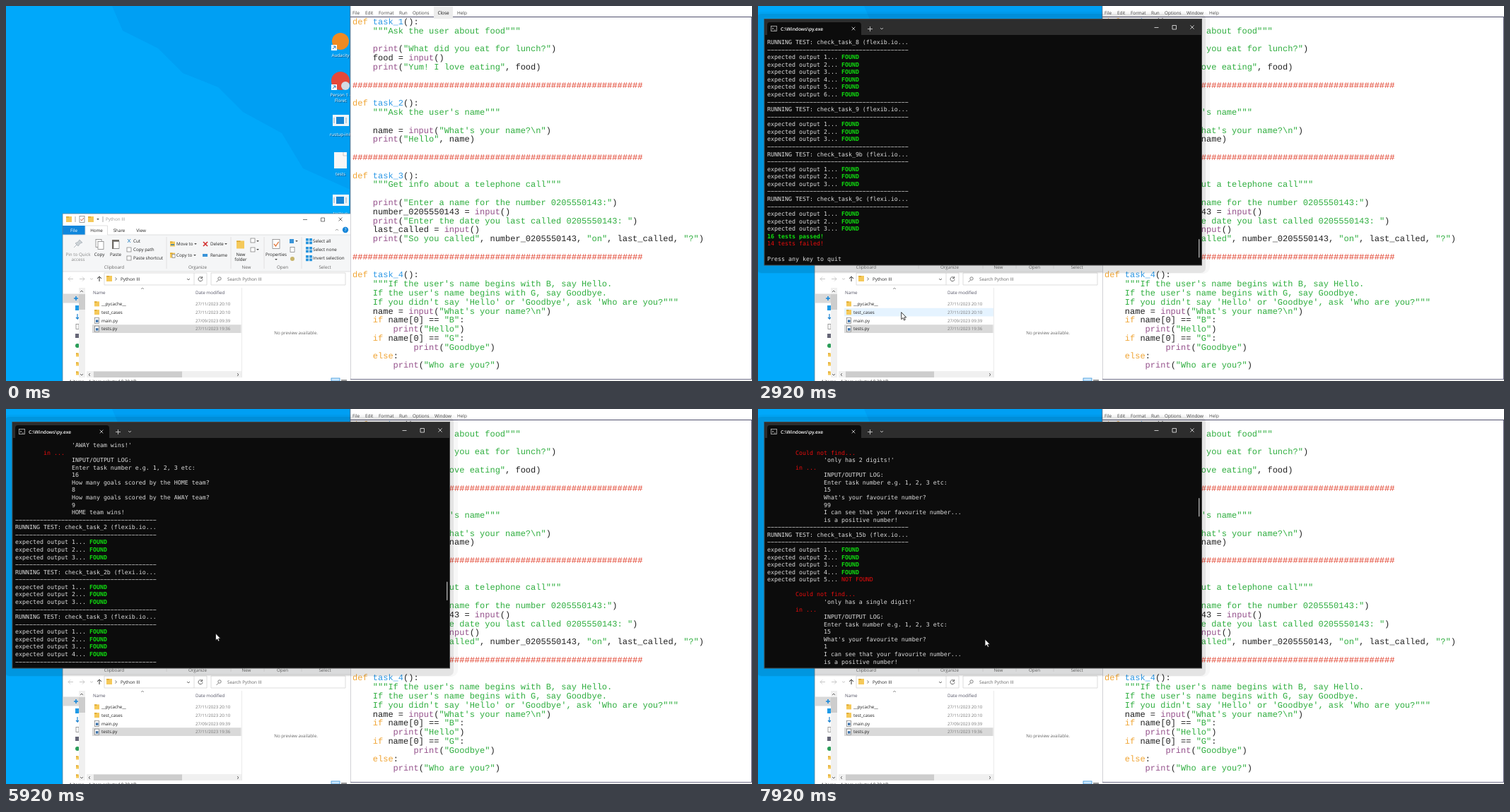
Write an HTML page that moves like this. It is 1055x531 px and loops after 8 s.

```html
<!DOCTYPE html>
<html lang="en">
<head>
<meta charset="utf-8">
<title>Running the tests</title>
<style>
html, body { margin: 0; width: 100%; height: 100%; overflow: hidden; background: #00a8fa; }
pre, svg { position: absolute; margin: 0; text-rendering: geometricPrecision; }
pre { left: 487px; top: 0; width: 564px; height: 514px; padding: 17px 0 0 3px; background: #fff;
  font: 12px/12.79px "Liberation Mono", monospace; color: #222; border-right: 1px solid #5a5a78; }
pre .comment { color: #e03a26; } pre .string { color: #2fae3f; } pre .keyword { color: #f0a535; }
pre .name { color: #2c98e6; } pre .builtin { color: #95528c; }
svg { left: 0; top: 0; font: 6.25px "Open Sans", sans-serif; }
svg text { white-space: pre; }
#lines { font: 8.31px "DejaVu Sans Mono", monospace; fill: #dcdcdc; }
.found { fill: #10dc10; font-weight: bold; } .missing { fill: #e80c0c; }
</style>
</head>
<body>
<pre id="editor"></pre>
<svg id="stage" width="1055" height="531" viewBox="0 0 1055 531"></svg>
<script>
const LOOP = 8000, PITCH = 10.57;

// ---------- editor ----------
const rule = '#'.repeat(57);
const source = String.raw`def task_1():
    """Ask the user about food"""

    print("What did you eat for lunch?")
    food = input()
    print("Yum! I love eating", food)

${rule}

def task_2():
    """Ask the user's name"""

    name = input("What's your name?\n")
    print("Hello", name)

${rule}

def task_3():
    """Get info about a telephone call"""

    print("Enter a name for the number 0205550143:")
    number_0205550143 = input()
    print("Enter the date you last called 0205550143: ")
    last_called = input()
    print("So you called", number_0205550143, "on", last_called, "?")

${rule}

def task_4():
    """If the user's name begins with B, say Hello.
    If the user's name begins with G, say Goodbye.
    If you didn't say 'Hello' or 'Goodbye', ask 'Who are you?"""
    name = input("What's your name?\n")
    if name[0] == "B":
        print("Hello")
    if name[0] == "G":
            print("Goodbye")
    else:
        print("Who are you?")`;
const token = /(?<comment>#+)|(?<string>"""[^"]*"""|"[^"]*")|(?<keyword>\b(?:def|if|else)\b)|(?<name>task_\d)|(?<builtin>\b(?:print|input)\b)/g;
document.getElementById('editor').innerHTML = source.replace(token, (text, ...rest) => {
  const groups = rest.at(-1);
  return `<span class="${Object.keys(groups).find(k => groups[k])}">${text}</span>`;
});

// ---------- drawing helpers ----------
const rect = (x, y, w, h, fill, more = '') => `<rect x="${x}" y="${y}" width="${w}" height="${h}" fill="${fill}" ${more}/>`;
const disc = (x, y, r, fill) => `<circle cx="${x}" cy="${y}" r="${r}" fill="${fill}"/>`;
const line = (d, stroke = '#555', width = 0.8, fill = 'none') =>
  `<path d="${d}" stroke="${stroke}" stroke-width="${width}" fill="${fill}"/>`;
// y is the vertical middle of the text
const text = (x, y, s, fill = '#222', more = '') => `<text x="${x}" y="${y + 2.2}" fill="${fill}" ${more}>${s}</text>`;
const mid = (x, y, s, fill, more = '') => text(x, y, s, fill, 'text-anchor="middle" ' + more);
const down = (x, y, color = '#444') => line(`M${x - 1.8} ${y - 1}h3.6l-1.8 2z`, 'none', 0, color);
const chevron = (x, y, dx, dy, color = '#444') => dx
  ? line(`M${x - dx} ${y - 2}l${2 * dx} 2l${-2 * dx} 2`, color)
  : line(`M${x - 2} ${y - dy}l2 ${2 * dy}l2 ${-2 * dy}`, color);
const cross = (x, y, r, color, w = 0.8) => line(`M${x - r} ${y - r}l${2 * r} ${2 * r}m0 ${-2 * r}l${-2 * r} ${2 * r}`, color, w);
const folder = (x, y, s = 8) => rect(x, y - s / 2, s, s, '#f5c95a') + rect(x, y - s / 2, s / 2, 1.5, '#dca52c');
const page = (x, y, w = 7, h = 9) => rect(x, y - h / 2, w, h, '#fff', 'stroke="#777" stroke-width=".7"');

// ---------- desktop ----------
function desktop() {
  const label = (y, s) => mid(474, y + 0.6, s, '#004070') + mid(473, y, s, '#fff');
  const shortcut = y => rect(460, y, 8, 8, '#fff') + line(`M462 ${y + 6}l4-4m-3 0h3v3`, '#1670c0', 1);
  const appWindow = y => rect(462, y, 23, 16, '#eef4f8') + rect(467, y + 3, 11, 10, '#1684d4') +
    line(`M464 ${y + 4}v8m17-8v8`, '#9ab', 1);
  return `<clipPath id="wall"><path d="M0 0H487V531H0z"/></clipPath><g clip-path="url(#wall)">
    ${rect(0, 0, 487, 531, '#00a8fa')}
    ${line('M150 0L165 35L215 60L250 95L300 115L335 150L390 180L420 230L487 260V0z', 'none', 0, '#009ff3')}
    ${disc(473, 50, 12, '#ef8a22') + shortcut(55) + label(70, 'Audacity')}
    ${disc(473, 106, 13, '#e5483a') + disc(480, 113, 6, '#d5dbe4') + shortcut(111)}
    ${label(126, 'Person 1 -') + label(134, 'Floret')}
    ${appWindow(154) + label(182, 'rustup-init')}
    ${rect(464, 207, 18, 23, '#f7f7f7') + line('M477 207v5h5', '#bbb') + label(238, 'tests')}
    ${appWindow(267) + label(294, 'testrun')}</g>`;
}

function editorFrame() {
  const items = [[490, 'File'], [508, 'Edit'], [527, 'Format'], [556, 'Run'], [575, 'Options'], [606, 'Window'], [638, 'Help']];
  return rect(487, 0, 568, 15, '#fff') + rect(487, 15, 568, 1, '#50506e') + rect(486.5, 0, 0.8, 531, '#667') +
    items.map(([x, s]) => text(x, 10, s, '#444', 'font-size="6.4"')).join('') +
    `<g id="tip">${rect(605, 1, 27, 17, '#ececec') + mid(618.5, 10, 'Close', '#111', 'font-size="6.4"')}</g>` +
    rect(487, 528, 568, 3, '#f0f0f0') + rect(487, 528, 568, 1, '#777790');
}

// ---------- file manager ----------
const ROW_TOP = 416, ROW = 11.75;
function explorer() {
  const groups = [[153, 'Clipboard'], [271, 'Organize'], [340, 'New'], [391, 'Open'], [451, 'Select']];
  const files = [['__pycache__', '27/11/2023 20:10'], ['test_cases', '27/11/2023 20:10'],
    ['main.py', '27/09/2023 09:39'], ['tests.py', '27/11/2023 19:36']];
  const selectIcon = y => [0, 5].map(d => rect(424 + d, y - 4, 4, 3.6, '#2c96dd') + rect(424 + d, y + 0.6, 4, 3.6, '#2c96dd')).join('');
  const title = `${rect(80, 294, 407, 237, '#fff')}
    ${folder(85, 302) + line('M98 298v8m39-8v8', '#999') + page(104, 302) + line('M105.5 302l1.5 2 3-4', '#c55030') + folder(116, 302) + down(130, 302)}
    ${text(141, 302, 'Python III', '#999', 'id="title"')}
    ${line('M420 302.5h6M445.500 300h5v5h-5z') + cross(473, 302, 2.5, '#444')}
    ${rect(80, 311, 32, 13, '#0f86dc') + mid(96, 318, 'File', '#fff')}
    ${rect(80, 324, 407, 52, '#f5f6f7') + line('M80 324H112V311H143.500V324H487M80 376H487', '#d8d8d8')}
    ${mid(128, 318, 'Home') + mid(160, 318, 'Share') + mid(191, 318, 'View')}
    ${chevron(468, 317, 0, -1, '#888') + disc(480, 317, 4.2, '#1686d9') + mid(480, 317, '?', '#fff')}`;
  const ribbon = `${line('M227 327V372M318 327V372M365 327V372M418 327V372', '#ddd')}
    ${groups.map(([x, s]) => mid(x, 370, s, '#666')).join('')}
    ${line('M104 331l4 4-3 1-3 4-4-4 4-2zm-4 7l-4 4', '#b5bcc2', 1, '#ccd2d6')}
    ${mid(102, 352, 'Pin to Quick', '#888') + mid(102, 359, 'access', '#888')}
    ${page(127, 336, 8, 11) + page(130, 339, 8, 11) + mid(132, 352, 'Copy')}
    ${rect(150, 331, 10, 13, '#6f6a63') + page(152, 338.5, 8, 10) + mid(155, 352, 'Paste')}
    ${line('M172 330l4 5m0-5l-4 5', '#1c79bb') + page(171, 345, 6, 6) + page(171, 357, 6, 6)}
    ${text(180, 333, 'Cut') + text(180, 345, 'Copy path') + text(180, 357, 'Paste shortcut')}
    ${folder(232, 337, 7) + line('M233 338h5', '#1c79bb', 1.4) + folder(232, 353, 7) + page(235, 354, 4, 5)}
    ${text(241, 337, 'Move to') + down(268, 337) + text(241, 353, 'Copy to') + down(267, 353)}
    ${cross(282, 337, 3, '#d22b2b', 1.6) + text(289, 337, 'Delete') + down(311, 337)}
    ${rect(278, 351, 7, 4, '#3a94d8') + text(289, 353, 'Rename')}
    ${folder(326, 338, 11) + mid(332, 352, 'New') + mid(332, 359, 'folder')}
    ${page(346, 332, 6, 6) + down(356, 333) + page(346, 345, 6, 6) + down(356, 345)}
    ${page(377, 337, 10, 13) + line('M379 337l2.500 3 4-6', '#e07030', 1.3) + mid(382, 352, 'Properties') + down(382, 359)}
    ${rect(401, 330, 6, 6, '#3a94d8') + down(411, 333) + page(402, 345, 6, 7) + disc(405, 358, 3, '#c8b46a')}
    ${[[333, 'Select all'], [345, 'Select none'], [357, 'Invert selection']].map(([y, s]) => selectIcon(y) + text(434, y, s)).join('')}`;
  const address = `${line('M95 386.500h-7l3-3m-3 3l3 3M104 386.500h7l-3-3m3 3l-3 3', '#bbb') + chevron(121, 386.5, 0, 0.8, '#bbb')}
    ${line('M132 390v-7l-3 3m3-3l3 3', '#333', 1)}
    ${line('M139 378H284V395H139zM266 378V395M290 378H480V395H290z', '#d5d5d5')}
    ${folder(142, 386) + chevron(155.5, 386.5, 0.8, 0) + text(162, 386.5, 'Python III') + chevron(258, 387, 0, 0.9)}
    ${line('M277.500 385a3 3 0 1 0 .5 2m-.5-4v2.500h-2.500', '#444')}
    <circle cx="302" cy="386" r="2.2" fill="none" stroke="#666" stroke-width=".8"/>${line('M300.500 388l-3 3', '#666')}
    ${text(313, 386.5, 'Search Python III', '#666')}`;
  const side = `${rect(81, 407.500, 23, 13, '#d9d9d9') + line('M96 414h6m-3-3v6', '#1686d9', 1.6)}
    ${rect(98, 424, 5, 7, '#1e9be8') + line('M101 436v7l-2-2m2 2l2-2', '#1e84d0', 1.2)}
    ${page(99, 454, 4, 7) + rect(98, 464, 5, 6, '#667') + disc(101, 481, 3, '#2a9d58')}
    ${[494, 507, 520].map(y => folder(99, y, 5)).join('')}
    ${rect(103, 399, 9, 127, '#f0f0f0') + rect(103, 408, 9, 22, '#cdcdcd') + chevron(107, 404, 0, -1) + chevron(107, 522, 0, 1)}`;
  const list = `${text(123, 406, 'Name', '#556') + chevron(193, 400, 0, -0.7, '#777') + text(268, 406, 'Date modified', '#556')}
    ${rect(122, 0, 211, ROW, '#e5f3ff', 'id="hover"')}
    ${rect(122, ROW_TOP + 3 * ROW, 210.500, ROW, '#d9d9d9', 'id="selected" stroke-width=".8"')}
    ${files.map(([name, date], i) => {
      const y = ROW_TOP + (i + 0.5) * ROW;
      const icon = i < 2 ? folder(125, y, 7) : page(125.5, y, 6, 8) + rect(127, y - 1, 3.500, 3.500, '#3a70a8');
      return icon + text(135, y, name) + text(268, y, date, '#777', 'font-size="6.05"');
    }).join('')}
    ${line('M333.500 399V526', '#e5e5e5') + mid(410, 463, 'No preview available.', '#666')}
    ${rect(114, 517, 219, 9, '#f0f0f0') + rect(124, 517.500, 125, 8.500, '#cdcdcd') + chevron(118, 522, -0.8, 0) + chevron(328, 522, 0.8, 0)}
    ${text(89, 531.5, '4 items') + text(117, 531.5, '1 item selected 8.20 KB')}
    ${rect(460, 527, 12, 4, '#cce8ff', 'stroke="#3a94d8" stroke-width=".8"') + rect(474, 529, 8, 2, '#999')}`;
  return rect(77, 291, 413, 245, '#000', 'id="glow" opacity=".15" rx="3"') + title + ribbon + address + side + list +
    line('M80 531V294H487', '#5b8298', 0.8);
}

// ---------- terminal ----------
const output = [];
const dashes = '\u2212'.repeat(40);
const bad = s => `<tspan class="missing">${s}</tspan>`;
const good = s => `<tspan class="found">${s}</tspan>`;
function failure([missing, ...log]) {
  const inner = [`'${missing}'`, null, 'INPUT/OUTPUT LOG:', 'Enter task number e.g. 1, 2, 3 etc:', ...log];
  output.push('', ' '.repeat(8) + bad('Could not find...'),
    ...inner.map(s => s === null ? ' '.repeat(8) + bad('in ...') : ' '.repeat(16) + s));
}
function test(id, count, fail) {
  output.push(dashes, `RUNNING TEST: check_task_${id} (${'flexib'.slice(0, 7 - id.length)}.io...`, dashes);
  for (let i = 1; i <= count; i++)
    output.push(`expected output ${i}... ` + (fail && i === count ? bad('NOT FOUND') : good('FOUND')));
  if (fail) failure(fail);
}
const favourite = (missing, n) =>
  [missing, '15', "What's your favourite number?", n, 'I can see that your favourite number...', 'is a positive number!'];

failure(favourite('only has 2 digits!', 99));
test('15b', 5, favourite('only has a single digit!', 1));
test('15c', 5, favourite('only has 3 digits!', 100));
test('15d', 5, favourite('only has 2 digits!', 10));
test('15e', 5, favourite('only has a single digit!', 9));
test('15f', 5, favourite('only has 3 digits!', 999));
test('16', 4);
test('16b', 5);
test('16c', 4);
test('16d', 4, ['AWAY team wins!', '16', 'How many goals scored by the HOME team?', '8',
  'How many goals scored by the AWAY team?', '9', 'HOME team wins!']);
for (const spec of '2:3 2b:3 3:4 3b:3 4:3 4b:3 4c:3 5:3 6:5 6b:3 6c:3 7:4 7b:3 7c:3 8:6 9:3 9b:3 9c:3'.split(' '))
  test(...spec.split(':'));
output.push(good('16 tests passed!'), bad('14 tests failed!'), '', 'Press any key to quit');

function terminal() {
  return `<g id="terminal">
    ${rect(-4, 8, 643, 371, '#000', 'rx="9" opacity=".03"') + rect(-2, 11, 635, 367, '#000', 'rx="7" opacity=".08"')}
    ${rect(9, 18.500, 618.500, 348.500, '#0c0c0c', 'stroke="#444" stroke-width="1"') + rect(9.500, 19, 617.500, 22, '#2d2d2d')}
    ${line('M13 41V27q0-4 4-4H142q4 0 4 4V41z', 'none', 0, '#0c0c0c')}
    ${rect(18.500, 28.500, 8, 7, '#111', 'stroke="#bbb" stroke-width=".8"') + line('M20 31l2 1-2 1m3 1h2', '#ccc', 0.7)}
    ${text(32, 32.5, 'C:\\Windows\\py.exe', '#fff', 'font-size="6.6" font-weight="600"')}
    ${cross(135, 32, 2.3, '#ddd') + line('M155 32.500h7m-3.500-3.500v7', '#ddd') + chevron(175, 32, 0, 0.9, '#ddd')}
    ${line('M560.500 30.500h6M586 27.500h5.500v5.500h-5.500z', '#eee') + cross(614, 30, 2.6, '#eee')}
    <g id="content"><g id="lines"></g>${rect(118, 351, 1, 11, '#ddd', 'id="caret"')}
      <g id="track">${rect(616, 41, 11, 325, '#242424') + down(622, 361, '#aaa') + line('M620 47h4l-2-2.500z', 'none', 0, '#aaa')}</g>
      ${rect(623, 0, 1.500, 26.500, '#a0a0a0', 'id="thumb" rx=".7"')}
    </g></g>`;
}

const pointer = `<path id="pointer" d="M0 0V10L2.300 7.900L3.900 11.300L5.600 10.500L4 7.300H7z" fill="#fff" stroke="#111" stroke-width=".8"/>`;
document.getElementById('stage').innerHTML = desktop() + editorFrame() + explorer() + terminal() + pointer;

const el = Object.fromEntries([...document.querySelectorAll('[id]')].map(node => [node.id, node]));
const show = (node, on) => node.setAttribute('visibility', on ? 'inherit' : 'hidden');
el.lines.innerHTML = Array.from({ length: 30 }, (_, i) => `<text x="13" y="${54 + i * PITCH}"></text>`).join('');
const rows = [...el.lines.children];

// ---------- motion: [time, ...values] ----------
const pointerPath = [[200, 676, 503], [460, 200, 458], [600, 200, 458], [1000, 143, 457], [2700, 143, 457], [2920, 202, 434],
  [3200, 400, 345], [3520, 611, 318], [3700, 618, 335], [4120, 618, 335], [4680, 241, 282], [4900, 241, 282],
  [5460, 250, 305], [5800, 290, 316], [6400, 322, 325], [7500, 322, 325], [7900, 321, 326]];
const scrollPath = [[4900, 236], [5460, 179], [5780, 150], [5980, 132], [6160, 132], [6240, 120], [6420, 120], [6440, 114],
  [6580, 100], [6760, 100], [6840, 84], [7020, 84], [7380, 42], [7560, 42], [7920, 0]];
function along(path, t) {
  const i = path.findIndex(key => key[0] > t);
  if (i < 1) return (i ? path.at(-1) : path[0]).slice(1);
  const a = path[i - 1], b = path[i], k = (t - a[0]) / (b[0] - a[0]);
  return a.slice(1).map((v, j) => v + (b[j + 1] - v) * k);
}
const clamp = v => Math.max(0, Math.min(1, v));

let shownTop = -1;
function draw(now) {
  const t = now % LOOP;
  const [x, y] = along(pointerPath, t);
  show(el.pointer, t >= 200);
  el.pointer.setAttribute('transform', `translate(${x} ${y})`);

  const row = t >= 200 && x > 122 && x < 333 ? Math.floor((y - ROW_TOP) / ROW) : -1;
  show(el.hover, row >= 0 && row < 3);
  el.hover.setAttribute('y', ROW_TOP + row * ROW);
  el.selected.setAttribute('fill', row === 3 ? '#cce8ff' : '#d9d9d9');
  el.selected.setAttribute('stroke', row === 3 ? '#99d1ff' : 'none');

  const active = t >= 1260 && t < 1800;
  el.title.setAttribute('fill', active ? '#111' : '#999');
  show(el.glow, active);

  show(el.terminal, t >= 1800);
  el.terminal.setAttribute('opacity', clamp(0.55 + (t - 1800) / 120));
  el.tip.setAttribute('opacity', t < 1800 ? 1 : 0.6 * clamp((1940 - t) / 140));
  show(el.content, t >= 1930);

  const top = Math.round(along(scrollPath, t)[0]);
  if (top !== shownTop) {
    rows.forEach((node, i) => { node.innerHTML = output[top + i]; });
    shownTop = top;
  }
  const wide = t >= 3600 && t < 4300;
  show(el.track, wide);
  show(el.caret, t >= 2380 && t < 2910);
  el.thumb.setAttribute('x', wide ? 619.5 : 623);
  el.thumb.setAttribute('width', wide ? 5 : 1.5);
  el.thumb.setAttribute('y', 126 + top * 204 / 236);
  requestAnimationFrame(() => draw(performance.now()));
}
draw(performance.now());
</script>
</body>
</html>
```
